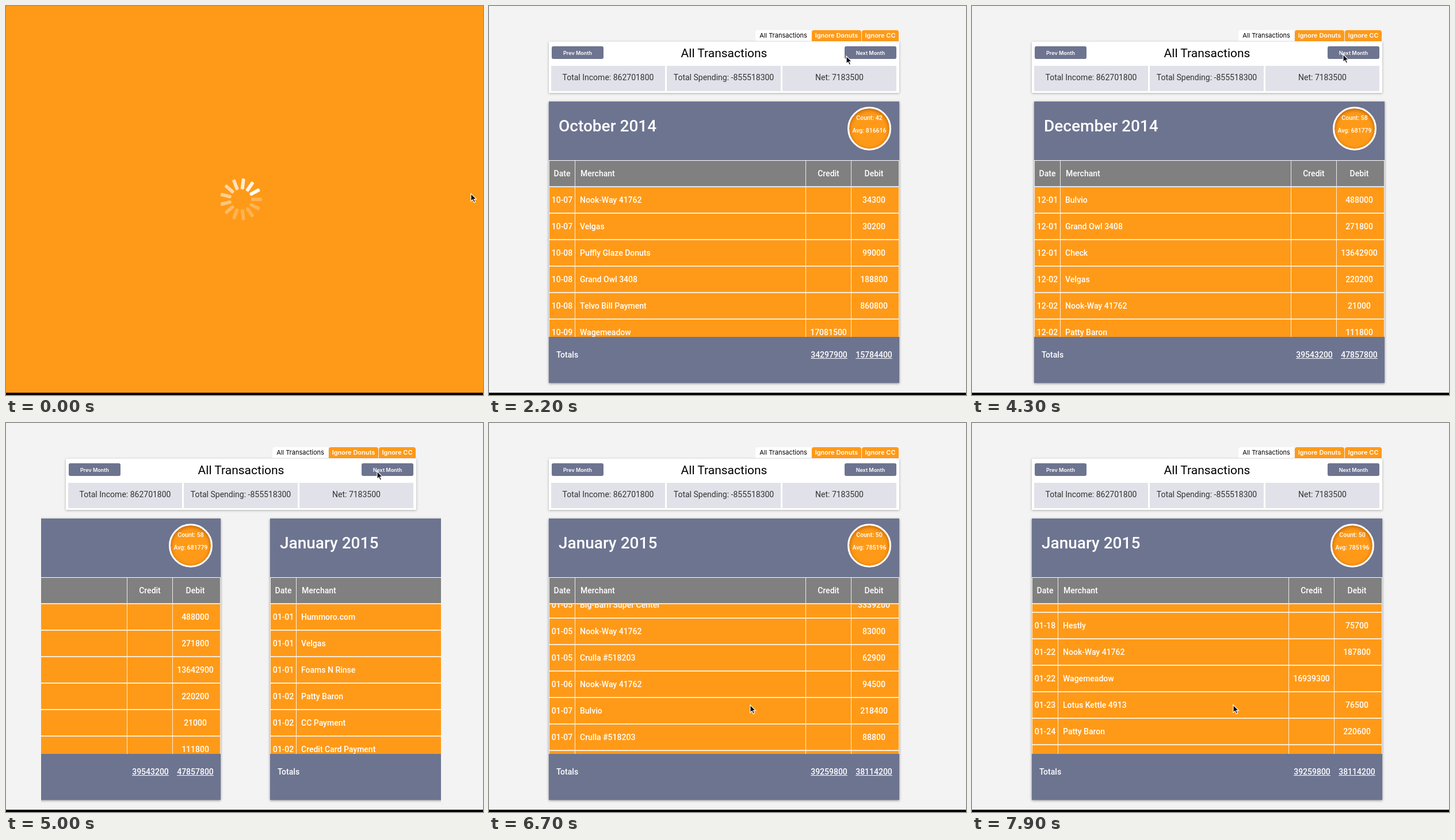
An HTML page for the animation above (8 s loop, 829 px wide and 676 px high).

```html
<!DOCTYPE html>
<html lang="en">
<head>
<meta charset="utf-8">
<title>Transactions</title>
<style>
* { box-sizing: border-box; }
html, body { margin: 0; width: 100%; height: 100%; overflow: hidden; }
body { background: #f3f3f3; font: 14px Roboto, sans-serif; }
#stage { position: relative; width: 829px; height: 676px; overflow: hidden; }
#stage div, svg { position: absolute; }
.tab { top: 42px; height: 19px; border-radius: 4px 4px 0 0; background: #ff9a18; color: #fff;
  font: 600 11px/19px Inter, sans-serif; text-align: center; white-space: nowrap; }
.tab.on { background: #fff; color: #000; font-weight: 400; }
#head { left: 104px; top: 62px; width: 609px; height: 89px; background: #fff; box-shadow: 0 1px 4px rgba(0,0,0,.3); }
#head h1 { margin: 0; font: 21px/40px Roboto, sans-serif; text-align: center; }
.button { top: 8px; width: 90px; height: 22px; border-radius: 3px; background: #6d7490; color: #fff;
  font: 600 9px/23px Inter, sans-serif; text-align: center; }
.stat { top: 42px; width: 198px; height: 44px; background: #e1e1e9; color: #333; line-height: 40px; text-align: center; }
#view { left: 61px; top: 160px; width: 695px; height: 508px; overflow: hidden; }
#track { left: 0; top: 0; }
.card { top: 6px; width: 609px; height: 489px; background: #6d7490; color: #fff; font-weight: 500;
  box-shadow: 0 1px 4px rgba(0,0,0,.45); }
.month { left: 17px; top: 23px; font-size: 28px; line-height: 40px; white-space: nowrap; }
.badge { left: 519px; top: 9px; width: 76px; height: 76px; border: 3px solid #fff; border-radius: 50%;
  background: #ff9a18; box-shadow: inset 0 2px 7px rgba(120,50,0,.55); font-size: 10.5px; line-height: 22px;
  text-align: center; padding-top: 6px; white-space: nowrap; }
.badge span { display: block; margin: 0 -5px; }
.body { top: 149px; width: 609px; height: 260px; overflow: hidden; }
#stage .row { position: relative; display: grid; grid-template-columns: 46px 401px 79px 83px;
  width: 609px; height: 46px; background: #ff9a18; border-bottom: 2px solid rgba(255,255,255,.8);
  line-height: 44px; text-align: center; white-space: nowrap; }
.row:nth-child(even) { background: #ea8a15; }
.row span { border-right: 1px solid rgba(255,255,255,.85); }
.row span:first-child { border-left: 1px solid rgba(255,255,255,.85); }
.row span:nth-child(2) { text-align: left; padding-left: 8px; }
.row span:nth-child(4) { padding-right: 4px; }
#stage .row.top { position: absolute; top: 102px; height: 47px; background: #808080; border-top: 1px solid #fff; }
.row.top span:nth-child(2) { padding-left: 9px; }
.foot { top: 430px; line-height: 20px; }
.sum { width: 80px; text-align: center; text-decoration: underline; }
#load { inset: 0; background: #ff9a18; }
#bar { left: 0; top: 672px; width: 829px; height: 4px; background: #000; }
</style>
</head>
<body>
<div id="stage">
  <div class="tab on" style="left:463px;width:97px">All Transactions</div>
  <div class="tab" style="left:561px;width:86px">Ignore Donuts</div>
  <div class="tab" style="left:648px;width:64px">Ignore CC</div>
  <div id="head">
    <h1>All Transactions</h1>
    <div class="button" style="left:5px">Prev Month</div>
    <div class="button" style="left:514px">Next Month</div>
    <div class="stat" style="left:4px">Total Income: 862701800</div>
    <div class="stat" style="left:205px">Total Spending: -855518300</div>
    <div class="stat" style="left:406px">Net: 7183500</div>
  </div>
  <div id="view"><div id="track"></div></div>
  <div id="load"><svg width="829" height="676"><g id="spin" fill="#fff" transform="translate(408.5 336)"></g></svg></div>
  <div id="bar"></div>
  <svg id="cursor" width="16" height="22" viewBox="-2 -2 16 22" style="left:-2px;top:-2px">
    <path d="M0 0V13.2L3.1 10.4L5.2 15.4L7.6 14.4L5.5 9.6H9.4Z" stroke="#fff" stroke-width="1.2"/>
  </svg>
</div>
<script>
const $ = id => document.getElementById(id);
const SLIDE = 695, LOOP = 8000, LOADED = 500, LINES = 13;

// Rows: date, merchant, debit, credit
const months = [
  ['October 2014', 42, 816616, 34297900, 15784400, `10-07,Nook-Way 41762,34300
10-07,Velgas,30200
10-08,Puffly Glaze Donuts,99000
10-08,Grand Owl 3408,188800
10-08,Telvo Bill Payment,860800
10-09,Wagemeadow,,17081500`],
  ['November 2014', 45, 877668, 39495100, 46256700, `11-02,ATM Withdrawal,820000
11-02,Check,13642900
11-03,Hummoro.com,99900
11-03,Credit Card Payment,,5194500
11-03,CC Payment,5194500
11-04,Reelquo.com,79900`],
  ['December 2014', 58, 681779, 39543200, 47857800, `12-01,Bulvio,488000
12-01,Grand Owl 3408,271800
12-01,Check,13642900
12-02,Velgas,220200
12-02,Nook-Way 41762,21000
12-02,Patty Baron,111800`],
  ['January 2015', 50, 785196, 39259800, 38114200, `01-01,Hummoro.com,99900
01-01,Velgas,50600
01-01,Foams N Rinse,506800
01-02,Patty Baron,144900
01-02,CC Payment,5194500
01-02,Credit Card Payment,,5194500
01-02,Check,13642900
01-03,Velgas,302100
01-04,Reelquo.com,79900
01-05,Grand Owl 3408,194300
01-05,Big-Barn Super Center,3339200
01-05,Nook-Way 41762,83000
01-05,Crulla #518203,62900
01-06,Nook-Way 41762,94500
01-07,Bulvio,218400
01-07,Crulla #518203,88800
01-08,Wagemeadow,,16939300
01-08,Velgas,281400
01-09,Telvo Bill Payment,860800
01-10,Grand Owl 3408,412700
01-11,ATM Withdrawal,820000
01-12,Nook-Way 41762,51200
01-13,Patty Baron,133600
01-14,Crulla #518203,74300
01-15,Bulvio,642900
01-16,Velgas,297500
01-17,Foams N Rinse,480000
01-18,Nook-Way 41762,66100
01-18,Hestly,75700
01-22,Nook-Way 41762,187800
01-22,Wagemeadow,,16939300
01-23,Lotus Kettle 4913,76500
01-24,Patty Baron,220600
01-25,Velgas,264800
01-26,Check,820000`]
];

const row = ([date, name, debit, credit = ''], cls = '') =>
  `<div class="row ${cls}">${[date, name, credit, debit].map(s => `<span>${s}</span>`).join('')}</div>`;

$('track').innerHTML = months.map(([title, count, avg, credit, debit, rows], i) => `
  <div class="card" style="left:${43 + i * SLIDE}px">
    <div class="month">${title}</div>
    <div class="badge"><span>Count: ${count}</span><span>Avg: ${avg}</span></div>
    ${row(['Date', 'Merchant', 'Debit', 'Credit'], 'top')}
    <div class="body"><div class="list">${rows.split('\n').map(r => row(r.split(','))).join('')}</div></div>
    <div class="foot" style="left:13px">Totals</div>
    <div class="foot sum" style="left:447px">${credit}</div>
    <div class="foot sum" style="left:525px">${debit}</div>
  </div>`).join('');
const list = [...document.querySelectorAll('.list')].pop();

$('spin').innerHTML = Array.from({ length: LINES }, (_, i) =>
  `<rect x="17.5" y="-3" width="19" height="6" rx="2" transform="rotate(${i * 360 / LINES})"/>`).join('');
const lines = [...$('spin').children];

const clamp = x => Math.max(0, Math.min(1, x));
const smooth = x => x * x * (3 - 2 * x);

// The CSS "ease" curve, solved by bisection
function ease(x) {
  let lo = 0, hi = 1;
  const bezier = (s, a, b) => 3 * a * s * (1 - s) ** 2 + 3 * b * s * s * (1 - s) + s ** 3;
  for (let i = 0; i < 20; i++) {
    const mid = (lo + hi) / 2;
    if (bezier(mid, .25, .25) < x) lo = mid; else hi = mid;
  }
  return bezier(lo, .1, 1);
}

// Keys are [time, value, ...]
function track(keys, t, curve = x => x) {
  let i = 0;
  while (i < keys.length - 2 && t >= keys[i + 1][0]) i++;
  const [t0, ...a] = keys[i], [t1, ...b] = keys[i + 1];
  const p = curve(clamp((t - t0) / (t1 - t0)));
  return a.map((v, k) => v + (b[k] - v) * p);
}

const pointer = [[0, 808, 326], [800, 808, 326], [1900, 630, 92], [2200, 621, 87], [2600, 645, 84],
  [5300, 645, 84], [5700, 454, 490], [LOOP, 454, 490]];
const scroll = [[5700, 0], [5800, 49], [6700, 481], [7900, 1273], [LOOP, 1339]];
const slides = [2850, 3850, 4856];

function draw(t) {
  $('load').style.display = t < LOADED ? '' : 'none';
  const head = LINES - 1 + t / 1000 * LINES;
  lines.forEach((line, i) => {
    const age = ((head - i) % LINES) / LINES;
    line.setAttribute('opacity', Math.max(.25, 1 - .75 * age / .6));
  });
  const page = slides.reduce((sum, start) => sum + ease(clamp((t - start) / 500)), 0);
  $('track').style.transform = `translateX(${-Math.round(page * SLIDE)}px)`;
  list.style.transform = `translateY(${-Math.round(track(scroll, t)[0])}px)`;
  const [x, y] = track(pointer, t, smooth);
  $('cursor').style.transform = `translate(${x}px,${y}px)`;
}

const begin = performance.now();
function tick() {
  // The screen refreshes ten times a second
  draw(Math.floor((performance.now() - begin) % LOOP / 100) * 100);
  requestAnimationFrame(tick);
}
tick();
</script>
</body>
</html>
```
